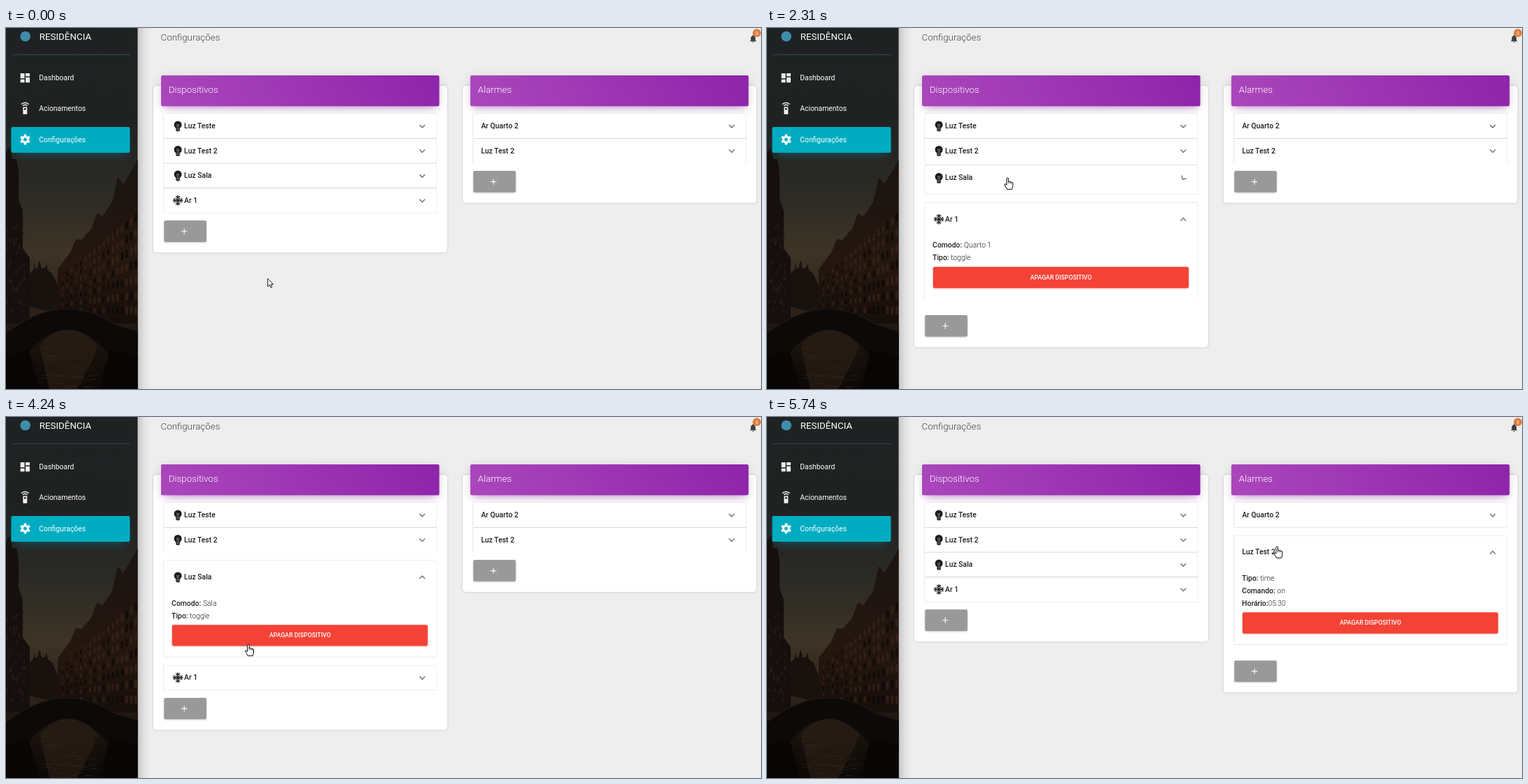
An HTML page that plays this animation: 1081 by 518 pixels, repeating every 9.06 s.

```html
<!DOCTYPE html>
<html lang="pt">
<head>
<meta charset="utf-8">
<title>Configurações</title>
<style>
html, body { margin: 0; width: 100%; height: 100%; overflow: hidden; background: #eee; }
#stage { display: block; width: 1081px; height: 518px; }
text { font-family: Roboto, sans-serif; font-size: 10.4px; white-space: pre; }
.title { font-size: 13.36px; font-weight: 300; }
.nav { fill: #fff; }
.row { font-weight: 500; fill: #1f1f1f; }
.info { font-weight: 300; fill: #222; }
.info tspan { font-weight: 500; }
.caps { font-size: 8.75px; font-weight: 500; fill: #fff; text-anchor: middle; }
.card { fill: #fff; filter: drop-shadow(0 .8px 1.5px rgba(0,0,0,.2)); }
.panel { fill: #fff; filter: drop-shadow(0 .9px .6px rgba(0,0,0,.36)); }
.add { fill: #999; filter: drop-shadow(0 1.2px 1.2px rgba(90,90,90,.35)); }
.danger { fill: #f44336; filter: drop-shadow(0 1.2px 1.2px rgba(160,50,40,.3)); }
.chev { fill: #757575; }
</style>
</head>
<body>
<svg id="stage" viewBox="0 0 1081 518" xmlns="http://www.w3.org/2000/svg">
  <defs>
    <linearGradient id="sky" x2="0" y2="1">
      <stop offset="0" stop-color="#1f2223"/>
      <stop offset=".25" stop-color="#202222"/>
      <stop offset=".45" stop-color="#2b2a25"/>
      <stop offset=".62" stop-color="#3d3426"/>
      <stop offset=".72" stop-color="#33271c"/>
      <stop offset="1" stop-color="#1a120d"/>
    </linearGradient>
    <linearGradient id="water" x2="0" y2="1">
      <stop offset="0" stop-color="#211811"/>
      <stop offset="1" stop-color="#0b0806"/>
    </linearGradient>
    <linearGradient id="brick" x2="0" y2="1">
      <stop offset="0" stop-color="#1a1411"/>
      <stop offset=".55" stop-color="#25170f"/>
      <stop offset="1" stop-color="#0f0a08"/>
    </linearGradient>
    <linearGradient id="edge">
      <stop offset="0" stop-color="#000" stop-opacity=".17"/>
      <stop offset=".5" stop-color="#000" stop-opacity=".05"/>
      <stop offset="1" stop-color="#000" stop-opacity="0"/>
    </linearGradient>
    <linearGradient id="purple" gradientUnits="userSpaceOnUse" x1="40.2" y1="113.7" x2="357.8" y2="-69.7">
      <stop offset="0" stop-color="#ab47bc"/>
      <stop offset="1" stop-color="#8e24aa"/>
    </linearGradient>
    <filter id="soft" x="-20%" y="-150%" width="140%" height="400%"><feGaussianBlur stdDeviation="7.4"/></filter>
    <filter id="near" x="-20%" y="-150%" width="140%" height="400%"><feGaussianBlur stdDeviation="3"/></filter>
    <clipPath id="side"><rect width="188.5" height="518"/></clipPath>
  </defs>
  <rect width="1081" height="518" fill="#eee"/>
  <rect x="188" width="20" height="518" fill="url(#edge)"/>
  <g id="sidebar" clip-path="url(#side)"></g>
  <text x="221.5" y="18.4" class="title" fill="#444">Configurações</text>
  <g id="bell"></g>
  <g id="cards"></g>
  <g id="cursor" stroke="#000" stroke-linejoin="round" fill="#fff">
    <path id="arrow" d="M.3.3V11.8L2.9 9.3 4.7 13.4 6.4 12.6 4.7 8.6H8.3Z" stroke-width=".9"/>
    <g id="hand">
      <path d="M-1.3 1.2Q0-.6 1.3 1.2V6q1.3-1 2.4.3 1.4-.6 2.2.6 1.5-.3 1.7 1.2V12Q7.4 14.6 6.3 16.8H-.6Q-2.3 13.4-4.4 10.6-4.4 8.5-2.6 9.4L-1.3 10.7Z"/>
      <path d="M1.3 6V8.6M3.7 6.3V8.8M5.9 6.9V9" stroke-width=".7"/>
    </g>
  </g>
</svg>
<script>
const LOOP = 9060, ROW = 35.6, GROW = 11.87, TOP = 122.8, K = 0.742;
const $ = id => document.getElementById(id);

const icons = {
  dash: 'M3 13h8V3H3v10zm0 8h8v-6H3v6zm10 0h8V11h-8v10zm0-18v6h8V3h-8z',
  remote: 'M15 9H9c-.55 0-1 .45-1 1v12c0 .55.45 1 1 1h6c.55 0 1-.45 1-1V10c0-.55-.45-1-1-1zm-3 6c-1.1 0-2-.9-2-2s.9-2 2-2 2 .9 2 2-.9 2-2 2zM7.05 6.05l1.41 1.41C9.37 6.56 10.62 6 12 6s2.63.56 3.54 1.46l1.41-1.41C15.68 4.78 13.93 4 12 4s-3.68.78-4.95 2.05zM12 0C8.96 0 6.21 1.23 4.22 3.22l1.41 1.41C7.26 3.01 9.51 2 12 2s4.74 1.01 6.36 2.64l1.41-1.41C17.79 1.23 15.04 0 12 0z',
  bell: 'M12 22c1.1 0 2-.9 2-2h-4c0 1.1.9 2 2 2zm6-6v-5c0-3.07-1.64-5.64-4.5-6.32V4c0-.83-.67-1.5-1.5-1.5s-1.5.67-1.5 1.5v.68C7.63 5.36 6 7.92 6 11v5l-2 2v1h16v-1z',
  chev: 'M16.59 8.59L12 13.17 7.41 8.59 6 10l6 6 6-6z'
};
const icon = (name, x, y, fill, k = K) =>
  `<path d="${icons[name]}" fill="${fill}" transform="translate(${x} ${y}) scale(${k}) translate(-12 -12)"/>`;
const spokes = (n, make) => Array.from({ length: n }, (_, i) => `<g transform="rotate(${i * 360 / n})">${make}</g>`).join('');

const gear = `<g transform="translate(27.4 160)" stroke="#fff" fill="none">
  <circle r="4" stroke-width="3"/>${spokes(6, '<path d="M0-4.5V-7.4" stroke-width="3.4"/>')}</g>`;
const bulb = `<circle cy="-1.7" r="5.5"/><path d="M-3 2H3V6.3L1.7 7.6H-1.7L-3 6.3Z"/>
  <path d="M-2-2.6L-.9-1 0-2.4.9-1 2-2.6M-.9-1V2.4M.9-1V2.4M-2.8 3.7H2.8M-2.8 5.5H2.8" fill="none" stroke="#999" stroke-width=".7"/>`;
const snow = `<g stroke="#1c1c1c" stroke-width="1.4" fill="none">
  ${spokes(4, '<path d="M0 0V-7.4M-2.9-6.2L0-3.3 2.9-6.2"/>')}
  ${spokes(4, '<path d="M0 0L3.4-3.4" stroke-width="1.2"/>')}</g>`;

// Sidebar: dusk canal in flat shapes
function scenery() {
  let seed = 7;
  const rnd = () => (seed = seed * 16807 % 2147483647) / 2147483647;
  let s = `<rect width="189" height="518" fill="url(#sky)"/>
    <path d="M34 400V352L40 346V336L42 345H45L48 333 51 345H55L58 338 60 348 66 352 74 370V410Z" fill="#18120e"/>
    <path d="M189 188L180 204 168 224 160 214 152 250 138 270 130 266 122 288 108 304 100 303 92 322 74 346V432L189 462Z" fill="url(#brick)"/>
    <path d="M0 178L6 170 9 188H15L18 206V246L24 262V316L34 330V420L0 446Z" fill="#15100d"/>`;
  for (let x = 80; x < 188; x += 6.5) {
    const k = (x - 74) / 115, top = 362 - 100 * k, base = 410 + 12 * k;
    for (let i = 0; i < 7; i++) {
      const y = top + (base - top) * i / 7;
      const fill = rnd() < .55 ? '#382318' : '#0b0807';
      s += `<rect x="${x}" y="${y}" width="${2 + 1.8 * k}" height="${(base - top) / 13}" fill="${fill}" opacity=".75"/>`;
    }
  }
  for (let i = 0; i < 40; i++)
    s += `<rect x="${rnd() * 26}" y="${275 + rnd() * 130}" width="2" height="5" fill="#35211a" opacity=".6"/>`;
  s += `<rect y="424" width="189" height="94" fill="url(#water)"/>
    <path d="M48 456Q88 410 132 456L122 480 102 518H62Z" fill="#2a2016" opacity=".65"/>
    <path d="M0 438L20 425Q88 380 154 425L189 436V476L146 468Q90 398 30 468L0 478Z" fill="#0c0a09"/>
    <path d="M20 424Q88 382 154 424" fill="none" stroke="#211a16" stroke-width="1.2"/>
    <path d="M0 472L32 462 48 518H0ZM189 470L148 462 134 518H189Z" fill="#080605"/>`;
  for (let i = 0; i < 46; i++)
    s += `<rect x="${50 + rnd() * 76}" y="${458 + rnd() * 58}" width="${4 + rnd() * 10}" height=".8" fill="#4a3826" opacity=".4"/>`;
  return s;
}

$('sidebar').innerHTML = scenery() + `
  <circle cx="27.7" cy="12" r="7.3" fill="#3f8dab"/>
  <text x="47.7" y="17.2" class="nav" style="font-size:13.36px">RESIDÊNCIA</text>
  <path d="M8 38.4H178" stroke="#30504f" stroke-width=".9"/>
  <rect x="15" y="155" width="155" height="26" fill="#00acc1" opacity=".4" filter="url(#soft)"/>
  <rect x="7.4" y="142" width="170" height="37" rx="2.2" fill="#00acc1"/>
  ${icon('dash', 27.3, 71.6, '#eee')}${icon('remote', 27.3, 115.5, '#eee')}${gear}
  <text x="47.2" y="74.7" class="nav">Dashboard</text>
  <text x="47.2" y="118.9" class="nav">Acionamentos</text>
  <text x="47.2" y="163.5" class="nav">Configurações</text>`;

$('bell').innerHTML = icon('bell', 1069.7, 15.4, '#3c4043', .56) + `
  <circle cx="1075" cy="7.2" r="5.9" fill="#dd7d3b"/>
  <text x="1075" y="9.5" fill="#fff" text-anchor="middle" style="font-size:6.4px">0</text>`;

// toggles: times at which the panel opens, closes, opens ...
const cards = [
  { x: 211, name: 'Dispositivos', textX: 29.6, panels: [
    { name: 'Luz Teste', icon: bulb },
    { name: 'Luz Test 2', icon: bulb },
    { name: 'Luz Sala', icon: bulb, toggles: [2277, 4745], full: 91, info: [['Comodo: ', 'Sala'], ['Tipo: ', 'toggle']] },
    { name: 'Ar 1', icon: snow, toggles: [1200, 3800], full: 91, info: [['Comodo: ', 'Quarto 1'], ['Tipo: ', 'toggle']] }
  ] },
  { x: 653.8, name: 'Alarmes', textX: 11.7, panels: [
    { name: 'Ar Quarto 2' },
    { name: 'Luz Test 2', toggles: [5490], full: 108.7, info: [['Tipo: ', 'time'], ['Comando: ', 'on'], ['Horário:', '05:30']] }
  ] }
];

function contents(p) {
  if (!p.info) return '';
  const y = p.info.length * 17.8 + 9.2;
  const lines = p.info.map(([a, b], i) =>
    `<text x="11.6" y="${17.4 + i * 17.8}" class="info"><tspan>${a}</tspan>${b}</text>`).join('');
  return `<svg class="body" width="392" height="0">${lines}
    <rect x="12.3" y="${y}" width="366" height="30.3" rx="2.2" class="danger"/>
    <text x="195.5" y="${y + 18.1}" class="caps">APAGAR DISPOSITIVO</text></svg>`;
}

function panelMarkup(p, textX) {
  return `<g class="item"><rect class="panel" width="391.3" rx="1.5"/>
    <path class="sep" d="M0 .1H391.3" stroke="#d9d9d9" stroke-width=".9"/>
    <g class="head">${p.icon ? `<g transform="translate(20.6 0)" fill="#1c1c1c">${p.icon}</g>` : ''}
    <text x="${textX}" y="3.4" class="row">${p.name}</text>
    <g class="turn"><path class="chev" d="${icons.chev}" transform="scale(${K}) translate(-12 -12)"/></g></g>
    ${contents(p)}</g>`;
}

$('cards').innerHTML = cards.map(c => `<g class="block" transform="translate(${c.x} 0)">
  <rect class="card" y="83" width="420.7" rx="4.4"/>
  <g transform="translate(11 68)">
    <rect y="3" width="398.4" height="44" opacity=".12" filter="url(#soft)"/>
    <rect x="7.4" y="16.3" width="383.6" height="29.2" fill="#9c27b0" opacity=".28" filter="url(#soft)"/>
    <rect x="3.7" y="8.9" width="391" height="36.6" fill="#9c27b0" opacity=".2" filter="url(#near)"/>
    <rect width="398.4" height="44.3" rx="2.2" fill="url(#purple)"/>
    <text x="10.8" y="25.2" class="title" fill="#fff">${c.name}</text>
  </g>
  ${c.panels.map(p => panelMarkup(p, c.textX)).join('')}
  <g class="plus"><rect class="add" x="15.3" width="60.7" height="30.7" rx="2.2"/>
    <path d="M40 15.5H48.4M44.2 11.3V19.7" stroke="#fff" stroke-width="1.1"/></g></g>`).join('');

document.querySelectorAll('.block').forEach((el, i) => {
  const c = cards[i], items = el.querySelectorAll('.item');
  c.bg = el.querySelector('.card');
  c.plus = el.querySelector('.plus');
  c.panels.forEach((p, j) => {
    p.el = items[j];
    for (const k of ['panel', 'sep', 'head', 'turn', 'body']) p[k] = items[j].querySelector('.' + k);
  });
});

// cubic-bezier(.4, 0, .2, 1)
function ease(x) {
  if (x <= 0) return 0;
  if (x >= 1) return 1;
  let lo = 0, hi = 1;
  for (let i = 0; i < 24; i++) {
    const u = (lo + hi) / 2, v = 1 - u;
    if (1.2 * v * v * u + .6 * v * u * u + u ** 3 < x) lo = u; else hi = u;
  }
  return 3 * (1 - lo) * lo * lo + lo ** 3;
}
const openness = (p, t, ms) => (p.toggles || []).reduce(
  (sum, at, i) => sum + (i % 2 ? -1 : 1) * ease((t - at) / ms), 0);

const path = [
  [410, 920, 357.3, 250.6],
  [1790, 2180, 344.4, 214.6],
  [2860, 3500, 341.6, 357],
  [4100, 4550, 364.4, 223.6],
  [4880, 5110, 730.2, 185.4]
];
function pointer(t) {
  let x = 374.5, y = 359.3;
  for (const [a, b, px, py] of path) {
    const u = Math.min(1, Math.max(0, (t - a) / (b - a))), k = u * u * (3 - 2 * u);
    x += (px - x) * k;
    y += (py - y) * k;
  }
  return [x, y];
}

const move = (el, x, y) => el.setAttribute('transform', `translate(${x} ${y})`);

function draw(t) {
  const [px, py] = pointer(t);
  let hot = false;
  const hit = (x, y, w, h) => { if (px > x && px < x + w && py > y && py < y + h) hot = true; };
  for (const c of cards) {
    let y = TOP, margin = 0, prev = 0;
    c.panels.forEach((p, i) => {
      const open = openness(p, t, 150), body = (p.full || 0) * openness(p, t, 250);
      const head = ROW + GROW * open;
      y += Math.max(margin, GROW * open);
      move(p.el, c.x === 211 ? 14.5 : 14.7, y);
      p.panel.setAttribute('height', head + body);
      p.sep.setAttribute('opacity', i && prev < .01 ? 1 - open : 0);
      move(p.head, 0, head / 2);
      p.turn.setAttribute('transform', `translate(370.5 .4) rotate(${180 * open})`);
      if (p.body) {
        p.body.setAttribute('y', head);
        p.body.setAttribute('height', Math.max(0, body));
      }
      const left = c.x + 14.5;
      hit(left, y, 391, head);
      if (body > 75) hit(left + 12, y + head + p.info.length * 17.8 + 9.2, 366, 30);
      y += head + body;
      margin = GROW * open;
      prev = open;
    });
    y += margin + 11.1;
    move(c.plus, 0, y);
    hit(c.x + 15, y, 61, 31);
    c.bg.setAttribute('height', y + 45.9 - 83);
  }
  move($('cursor'), px, py);
  $('hand').setAttribute('display', hot ? 'inline' : 'none');
  $('arrow').setAttribute('display', hot ? 'none' : 'inline');
}

const start = performance.now();
function tick() {
  draw((performance.now() - start) % LOOP);
  requestAnimationFrame(tick);
}
tick();
</script>
</body>
</html>
```
